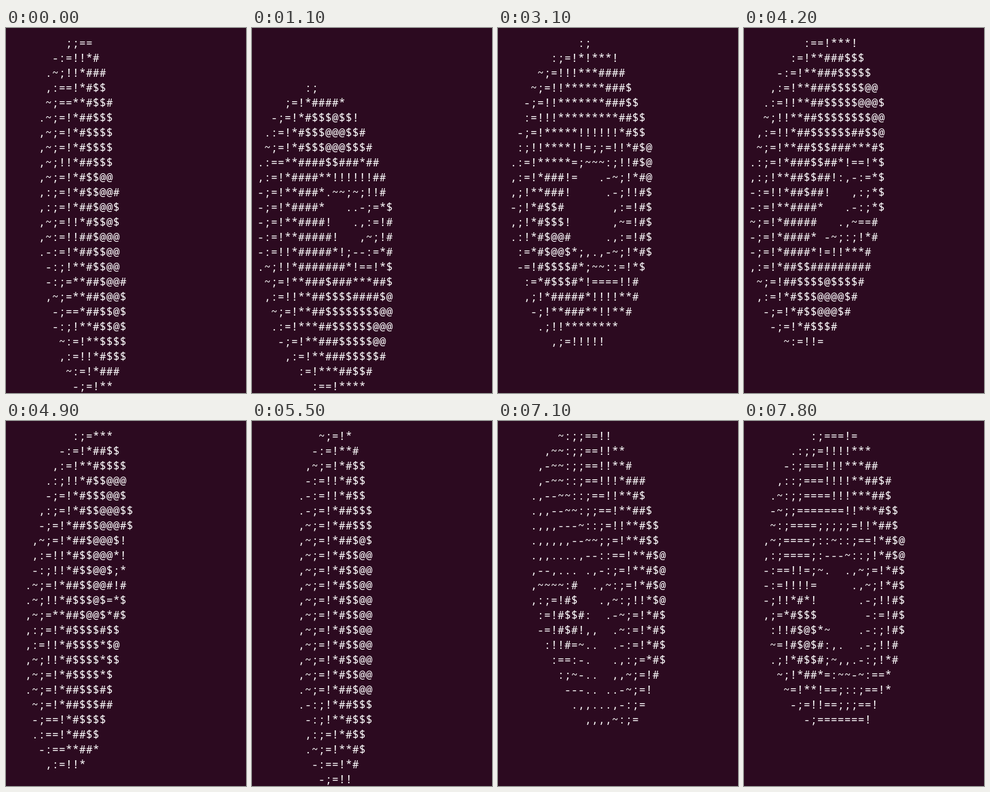
Recreate the animation shown at these times as an HTML page. Size 354 px wide and 538 px high, loop 7.9 s.

```html
<!DOCTYPE html>
<html lang="en">
<head>
<meta charset="utf-8">
<title>Spinning torus</title>
<style>
  html, body { margin: 0; width: 100%; height: 100%; overflow: hidden; background: #2c0a20; }
  pre {
    position: absolute; left: 8px; top: 11px; margin: 0;
    font: 16px/22px "Noto Sans Mono", monospace;
    letter-spacing: 0.4px; font-variant-ligatures: none;
    color: #fff;
  }
</style>
</head>
<body>
<pre id="screen"></pre>
<script>
const screen = document.getElementById('screen');
const SHADES = '.,-~:;=!*#$@';
const COLS = 26, ROWS = 24;
const SCALE = 15.6, MID_COL = 12, MID_ROW = 12, DISTANCE = 5;
const TICK = 100, TICKS = 79;
const HELD = [5, 30, 35, 39, 52, 65, 69];   // ticks on which the pose rests

function render(a, b) {
  const sa = Math.sin(a), ca = Math.cos(a), sb = Math.sin(b), cb = Math.cos(b);
  const cells = Array.from({ length: ROWS }, () => Array(COLS).fill(' '));
  const depth = new Float32Array(ROWS * COLS);

  for (let theta = 0; theta < 2 * Math.PI; theta += 0.07) {
    const ct = Math.cos(theta), st = Math.sin(theta), ring = 2 + ct;
    for (let phi = 0; phi < 2 * Math.PI; phi += 0.02) {
      const cp = Math.cos(phi), sp = Math.sin(phi);
      const rx = sa * cb * sp - sb * cp, ry = -cb * cp - sa * sb * sp, rz = ca * sp;
      const ax = -ca * cb, ay = ca * sb, az = sa;

      const light = 8 * (rx * ct + ax * st - rz * ct - az * st);
      if (light < 0) continue;

      const near = 1 / (DISTANCE + rz * ring + az * st);
      const col = Math.floor(MID_COL + SCALE * near * (rx * ring + ax * st));
      const row = Math.floor(MID_ROW + SCALE * near * (ry * ring + ay * st));
      if (col < 0 || col >= COLS || row < 0 || row >= ROWS) continue;

      const i = row * COLS + col;
      if (near > depth[i]) {
        depth[i] = near;
        cells[row][col] = SHADES[Math.floor(light)];
      }
    }
  }
  return cells.map(line => line.join('')).join('\n');
}

let shown = -1;
function frame(now) {
  const tick = Math.floor(now / TICK) % TICKS;
  const pose = tick - HELD.filter(t => t <= tick).length;
  if (pose !== shown) {
    shown = pose;
    screen.textContent = render(0.2 + 0.0573 * pose, 0.17 + 0.0598 * pose);
  }
  requestAnimationFrame(frame);
}
frame(performance.now());
</script>
</body>
</html>
```
